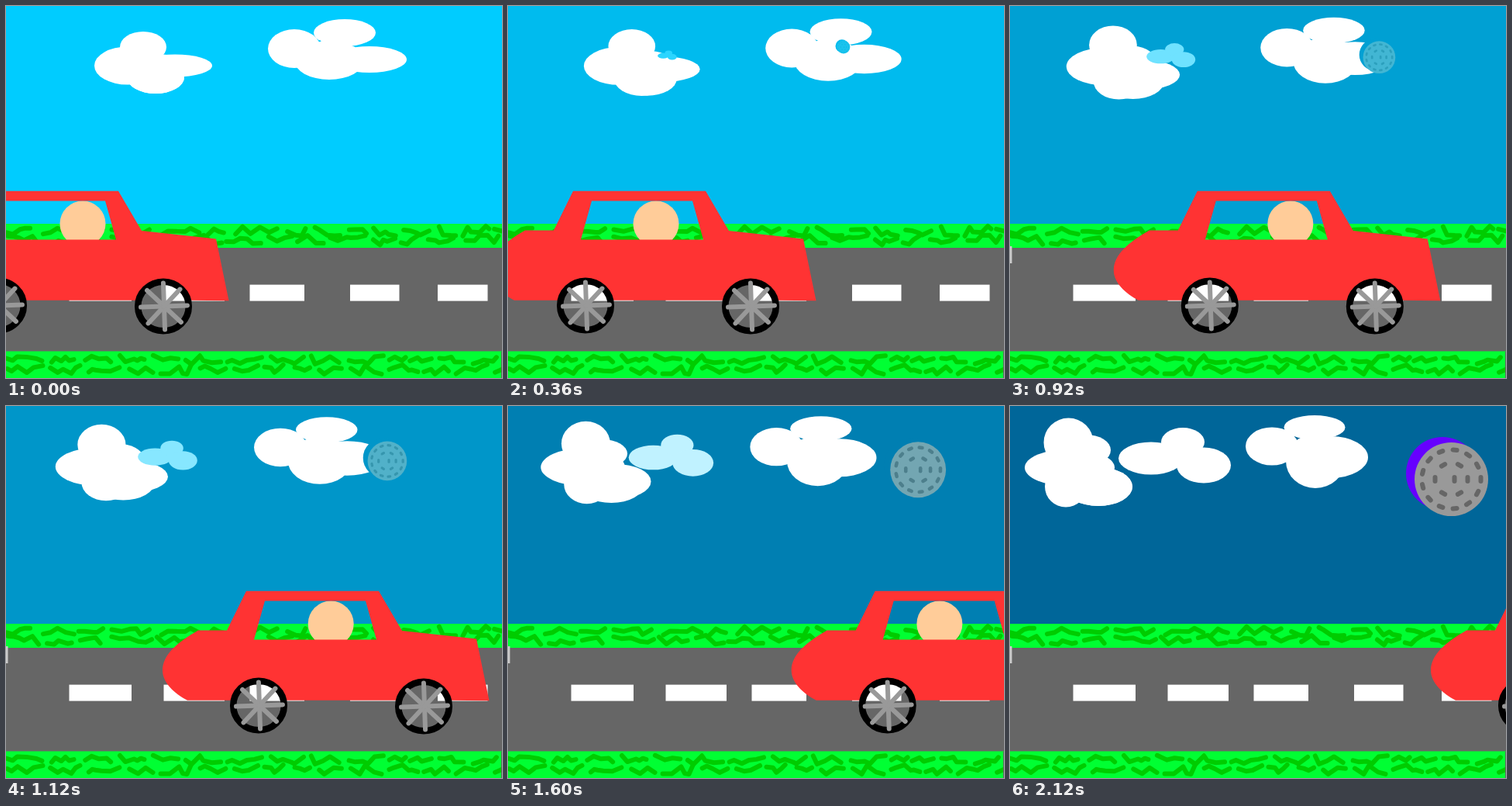
Recreate the animation shown at these times as an HTML page with a canvas. Size 640 by 480 pixels, loop 2160 ms.

```html
<!DOCTYPE html>
<html lang="en">
<head>
<meta charset="utf-8">
<title>Evening drive</title>
<style>
html, body { margin: 0; width: 100%; height: 100%; overflow: hidden; }
canvas { display: block; }
</style>
</head>
<body>
<canvas id="stage" width="640" height="480"></canvas>
<script>
const ctx = document.getElementById('stage').getContext('2d');
const LOOP = 2160, STEP = 40, LAST = LOOP - STEP;
const DAY = [0, 204, 255], NIGHT = [0, 102, 153], WHITE = [255, 255, 255];
const FLOOR_Y = 379.7, WHEEL_RX = 37, WHEEL_RY = 36;

// Each lobe morphs between two ellipses: x, y, rx, ry
const CLOUDS = [
  [157, 77, 43, 24.5, 77, 79.5, 58, 24],
  [177, 53, 30, 20, 75.5, 47, 32, 31.5],
  [195, 75, 33, 13, 98, 57, 32, 20],
  [218, 77, 48, 14.5, 114, 104, 44, 25],
  [193, 92, 37, 21, 72, 104, 27, 26.5],
  [193, 92, 37, 21, 114, 104, 44, 25],
  [372, 55, 34, 25, 338, 52, 34, 24.5],
  [437, 34.5, 40, 17.5, 393, 27.5, 39.5, 15.5],
  [469, 69, 48, 17, 414, 66, 48, 27],
  [417, 70, 45, 25, 394, 71, 38, 35]
];
const PUFFS = [[-22, 4, 42, 21], [19, -17, 28, 18.5], [46, 13, 35, 23]];

// Key points: time in ms, x
const CAR = [[0, -134], [360, -24], [815, 98], [LAST, 543]];
const HEAD = [[0, 99], [360, 191], [680, 293], [LAST, 706]];

const lerp = (a, b, t) => a + (b - a) * t;
const mix = (a, b, t) => `rgb(${a.map((v, i) => Math.round(lerp(v, b[i], t)))})`;

function at(keys, ms) {
  const i = keys.findIndex(k => k[0] >= ms) || 1;
  const [[t0, x0], [t1, x1]] = [keys[i - 1], keys[i]];
  return lerp(x0, x1, (ms - t0) / (t1 - t0));
}

function rect(color, x, y, w, h) {
  ctx.fillStyle = color;
  ctx.fillRect(x, y, w, h);
}

function ellipse(color, x, y, rx, ry = rx) {
  ctx.fillStyle = color;
  ctx.beginPath();
  ctx.ellipse(x, y, rx, ry, 0, 0, 7);
  ctx.fill();
}

function pen(color, width) {
  ctx.strokeStyle = color;
  ctx.lineWidth = width;
  ctx.lineCap = ctx.lineJoin = 'round';
}

function line(...points) {
  ctx.beginPath();
  points.forEach(p => ctx.lineTo(...p));
  ctx.stroke();
}

function polygon(...points) {
  ctx.moveTo(...points[0]);
  points.slice(1).forEach(p => ctx.lineTo(...p));
}

function grass(top, height, seed) {
  const rnd = () => (seed = seed * 16807 % 2147483647) / 2147483647;
  rect('#0f3', 0, top, 640, height);
  pen('#0c0', 6);
  for (const row of [.3, .68]) {
    for (let x = rnd() * 8; x < 640; x += 1 + rnd() * 4) {
      const points = [];
      for (let n = 3 + rnd() * 3; n > 0; n--) {
        points.push([x, top + height * row + (rnd() - .5) * 13]);
        x += 4 + rnd() * 9;
      }
      line(...points);
    }
  }
}

function ground() {
  rect('#666', 0, 311, 640, 135);
  grass(281, 31, 71);
  grass(445.5, 34.5, 919);
  for (const [x, w] of [[81.5, 80.5], [203.5, 78.5], [314.5, 70.5], [444, 63.5], [557, 64.5]]) {
    rect('#fff', x, 359.6, w, 21);
  }
  rect('#ccc', 0, 310, 2.5, 22);
  rect('#666', 639, 446, 1, 34);
}

function moon(t, sky) {
  ctx.save();
  ctx.translate(lerp(405, 569.5, t), lerp(44.5, 94.5, t));
  ctx.scale(lerp(.01, 1, t), lerp(.01, 1, t));
  ellipse(t < 1 ? sky : '#60f', -11.5, -7.5, 47);
  ellipse(mix(DAY, [153, 153, 153], t), 0, 0, 47.5);
  pen(mix(DAY, [102, 102, 102], t), 6);
  for (const [count, radius] of [[13, 38], [6, 21], [1, 4]]) {
    for (let i = 0; i < count; i++) {
      ctx.save();
      ctx.rotate(i / count * 2 * Math.PI);
      line([radius, -2.5], [radius, 2.5]);
      ctx.restore();
    }
  }
  ctx.restore();
}

// Bottom edge of the body bends around the wheel
function arch(x, y) {
  const ry = WHEEL_RY - 4, a = Math.asin((FLOOR_Y - y) / ry);
  ctx.ellipse(x, y, WHEEL_RX - 4, ry, 0, a, Math.PI - a, true);
}

function wheel(x, y) {
  pen('#000', 8.5);
  ctx.beginPath();
  ctx.ellipse(x, y, WHEEL_RX - 4.2, WHEEL_RY - 4.2, 0, 0, 7);
  ctx.stroke();
  pen('#999', 6);
  for (let i = 0; i < 8; i++) {
    const a = (i * 45 - 2) * Math.PI / 180;
    line([x + 1, y], [x + 1 + 30 * Math.cos(a), y + 30 * Math.sin(a)]);
  }
}

function car(ms) {
  const rear = [124, 386.5], front = [337, 387.5];
  ellipse('#fc9', at(HEAD, ms), 281, 29.5);
  ctx.save();
  ctx.translate(at(CAR, ms), 0);
  ctx.fillStyle = '#f33';
  ctx.beginPath();
  polygon([46, 289.5], [83, 289.5], [108, 238.7], [279, 238.7], [309, 290], [405, 300.5], [421.5, 380.3]);
  arch(...front);
  arch(...rear);
  ctx.lineTo(32, FLOOR_Y);
  ctx.bezierCurveTo(15, 371, 0, 357, 0, 341);
  ctx.bezierCurveTo(0, 321, 19, 305, 46, 289.5);
  ctx.closePath();
  polygon([132, 251.5], [262, 251.5], [276, 301.5], [118, 301.5]);
  ctx.fill('evenodd');
  wheel(...rear);
  wheel(...front);
  ctx.restore();
}

function draw() {
  const ms = Math.floor(performance.now() % LOOP / STEP) * STEP;
  const t = ms / LAST, sky = mix(DAY, NIGHT, t);
  rect(sky, 0, 0, 640, 480);
  for (const c of CLOUDS) ellipse('#fff', ...[0, 1, 2, 3].map(i => lerp(c[i], c[i + 4], t)));
  const puff = mix(DAY, WHITE, t);
  for (const [x, y, rx, ry] of PUFFS) ellipse(puff, 204 + x * t, 63.5 + y * t, rx * t, ry * t);
  moon(t, sky);
  ground();
  car(ms);
  requestAnimationFrame(draw);
}
draw();
</script>
</body>
</html>
```
